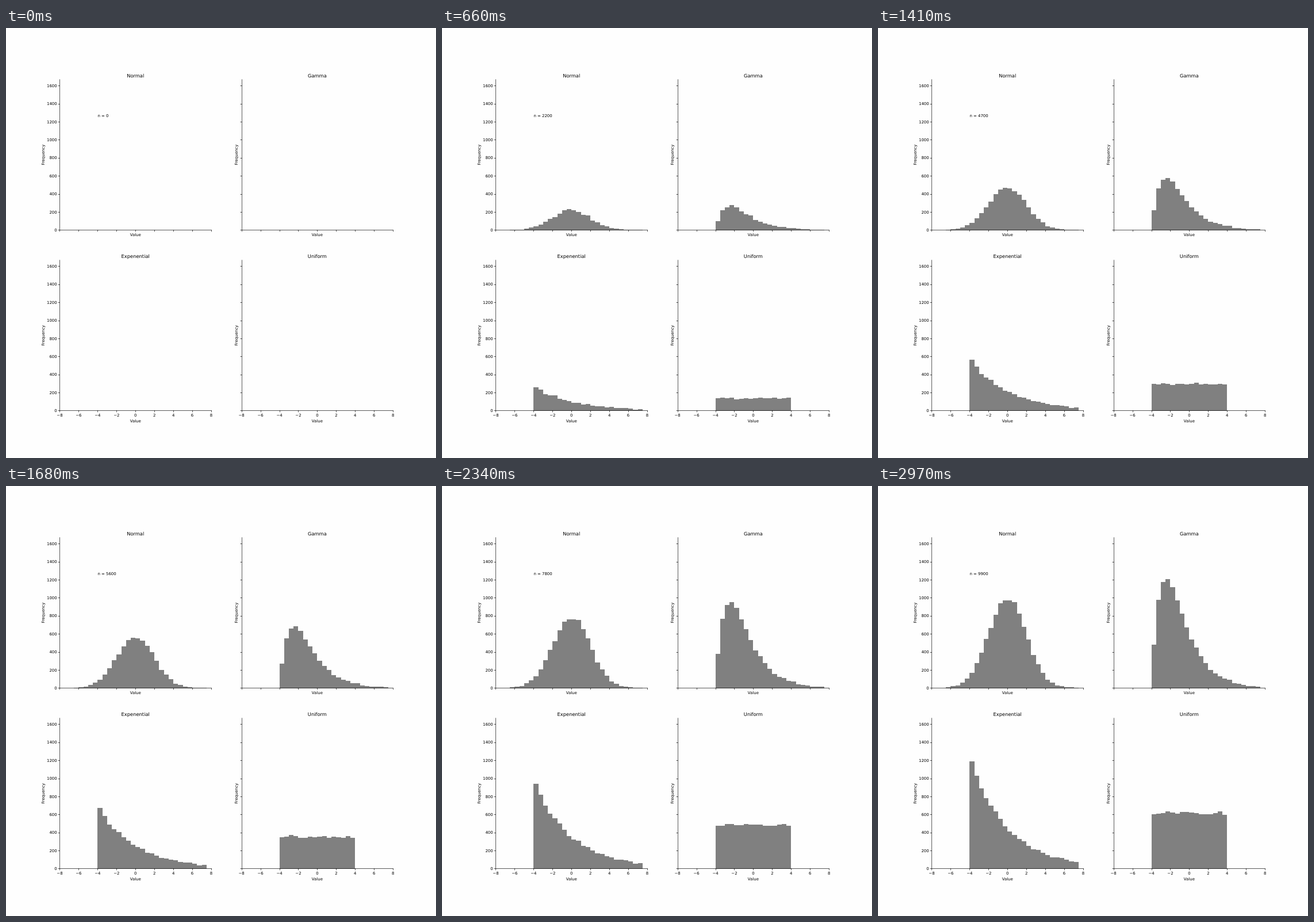
These frames come from a looping animation (748 px wide and 748 px high, 3 s). An HTML page:

```html
<!DOCTYPE html>
<html lang="en">
<head>
<meta charset="utf-8">
<title>Growing histograms</title>
<style>
html, body { margin: 0; width: 100%; height: 100%; overflow: hidden; background: #fefefe; }
svg { display: block; }
text { font: 6.94px "DejaVu Sans", sans-serif; text-anchor: middle; text-rendering: geometricPrecision; }
.title { font-size: 8.33px; }
.end { text-anchor: end; }
.start { text-anchor: start; }
.bars { fill: #808080; shape-rendering: crispEdges; }
.axes { fill: none; stroke: #000; stroke-width: .65; stroke-linecap: square; }
</style>
</head>
<body>
<svg id="stage" width="748" height="748" viewBox="0 0 748 748"></svg>
<script>
const W = 263.5, H = 261.8, UNIT = W / 16, COUNT = H * 6 / 10000;
const STEP = 30, STEPS = 100, DRAWS = 100;
const FIRST = -6.5, BIN = .5, BINS = 28, TICK = 2.4;
const stage = document.getElementById("stage");

// Probability densities; all but the normal one start at -4.
const panels = [
  { name: "Normal", col: 0, row: 0,
    density: v => Math.exp(-v * v / 8) / Math.sqrt(8 * Math.PI) },
  { name: "Gamma", col: 1, row: 0,
    density: v => v < -4 ? 0 : (v + 4) / 2.25 * Math.exp(-(v + 4) / 1.5) },
  { name: "Expenential", col: 0, row: 1,
    density: v => v < -4 ? 0 : Math.exp(-(v + 4) / 4) / 4 },
  { name: "Uniform", col: 1, row: 1,
    density: v => Math.abs(v) < 4 ? 1 / 8 : 0 }
];

let seed = 7;
function random() {
  seed = seed * 16807 % 2147483647;
  return seed / 2147483647;
}

const snap = v => Math.round(v) + .5;

function add(tag, attrs, text = "") {
  const el = document.createElementNS("http://www.w3.org/2000/svg", tag);
  for (const key in attrs) el.setAttribute(key, attrs[key]);
  el.textContent = text;
  return stage.appendChild(el);
}

function label(text, x, y, cls = "") {
  return add("text", { x, y, class: cls }, text);
}

// Each step adds the expected share of the draws, with some sampling scatter.
function grow(density) {
  const heights = Array(BINS).fill(0), history = [];
  for (let s = 0; s < STEPS; s++) {
    history.push([...heights]);
    for (let i = 0; i < BINS; i++) {
      const share = DRAWS * BIN * density(FIRST + (i + .5) * BIN);
      heights[i] += Math.max(0, share + (random() * 2 - 1) * Math.sqrt(share));
    }
  }
  return history;
}

function build(p) {
  p.x = 93.49 + p.col * 316.16;
  p.y = 351.56 + p.row * 314.16;
  p.history = grow(p.density);
  p.bars = add("path", { class: "bars" });

  const left = snap(p.x), base = Math.floor(p.y) + .5;
  let d = `M${left} ${p.y - H}V${base}M${left - TICK} ${base}H${p.x + W}`;
  for (let v = -8; v <= 8; v += 2) {
    const x = p.x + (v + 8) * UNIT;
    d += `M${snap(x)} ${base}v${TICK}`;
    if (p.row) label(String(v).replace("-", "\u2212"), x, 675.9);
  }
  for (let c = 0; c <= 1600; c += 200) {
    const y = p.y - c * COUNT;
    if (c) d += `M${left} ${snap(y)}h${-TICK}`;
    if (!p.col) label(c, 88.7, y + 2.5, "end");
  }
  add("path", { d, class: "axes" });

  const mid = p.x + W / 2;
  label(p.name, mid, p.y - H - 4.1, "title");
  label("Value", mid, p.row ? 686 : 362);
  const fx = p.col ? 402.9 : 67, fy = p.y - H / 2;
  label("Frequency", fx, fy).setAttribute("transform", `rotate(-90 ${fx} ${fy})`);
}

function drawBars(p, step) {
  let d = `M${p.x + (FIRST + 8) * UNIT} ${p.y}`;
  for (const count of p.history[step]) d += `V${p.y - count * COUNT}h${BIN * UNIT}`;
  p.bars.setAttribute("d", d + `V${p.y}Z`);
}

panels.forEach(build);
const counter = label("n = 0", 159.4, 155.2, "start");
const began = performance.now();
let shown = -1;

function tick() {
  const step = Math.floor((performance.now() - began) / STEP) % STEPS;
  if (step !== shown) {
    shown = step;
    counter.textContent = "n = " + step * DRAWS;
    panels.forEach(p => drawBars(p, step));
  }
  requestAnimationFrame(tick);
}
tick();
</script>
</body>
</html>
```
